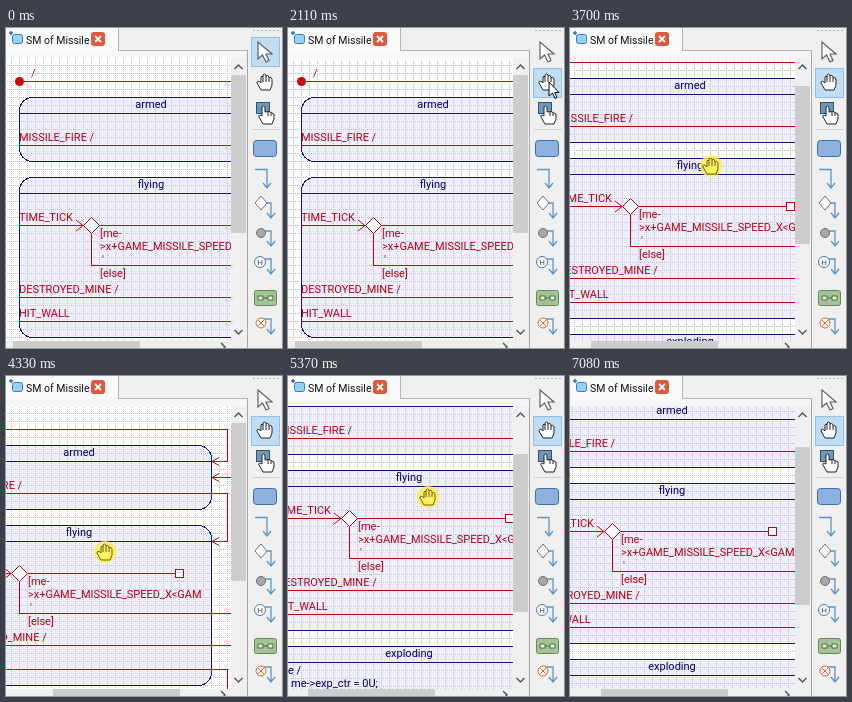
An HTML page that plays this animation: 276 by 320 pixels, repeating every 7.68 s.

```html
<!DOCTYPE html>
<html lang="en">
<head>
<meta charset="utf-8">
<title>State machine panning</title>
<style>
  html, body { margin: 0; width: 100%; height: 100%; overflow: hidden; background: #f0f0f0; }
  svg { display: block; width: 276px; height: 320px; }
  text { font: 11px Roboto, "Open Sans", sans-serif; }
  .crisp, .wire, .edge { shape-rendering: crispEdges; }
  .wire, .tip { fill: none; stroke: #c80000; }
  .red { fill: #b80010; }
  .navy { fill: #000060; }
  .edge { fill: none; stroke: #101080; }
  .state { fill: #eeeefc; }
  .blue { fill: none; stroke: #5b95c8; stroke-width: 1.3; }
  .bar { fill: #cdcdcd; }
  .arrow { fill: none; stroke: #505868; stroke-width: 1.5; }
  .hand { fill: var(--palm, #fff); stroke: var(--ink, #222); stroke-linejoin: round; }
  .halo { fill: #fff040; opacity: 0; }
  .drag { --palm: #fff060; --ink: #6c5c18; }
  .drag .halo { opacity: .8; }
</style>
</head>
<body>
<svg viewBox="0 0 276 320">
  <defs>
    <pattern id="grid" width="8" height="8" x="5" y="5" patternUnits="userSpaceOnUse">
      <path class="crisp" d="M0 .5H8M.5 0V8" stroke="#bcbccc" stroke-dasharray="1 1" fill="none"/>
    </pattern>
    <clipPath id="view"><rect y="30" width="225" height="283"/></clipPath>
    <path id="hand" class="hand" d="M-4 8L-8 1Q-8-2-5 0L-4 1V-5Q-3-7-2-5V-7Q-.5-9 1-7V-6Q3-8 4-5V-4Q6-6 7-3V3L5 8ZM-2-5V0M1-6V0M4-4V0"/>
    <path id="drop" class="blue" d="M-3-7H6V7M2 3L6 8L10 3"/>
  </defs>

  <g clip-path="url(#view)">
    <rect width="225" height="320" fill="#fff"/>
    <g id="world">
      <g id="fills"></g>
      <rect x="-16" y="-16" width="400" height="500" fill="url(#grid)"/>
      <g id="edges"></g>
      <path class="wire" d="M13 53.5H293.5V85.5H278M13 117.5H293.5V165.5H278M340 101.5H278
        M13 197.5H77M93 197.5H241M85.5 206V237.5H340M13 269.5H340M13 293.5H293.5V341.5H278"/>
      <path id="tips" class="tip"/>
      <path class="tip" d="M70 192L77 197.5L70 203"/>
      <path d="M85.5 189.5L93.5 197.5L85.5 205.5L77.5 197.5Z" fill="#fff" stroke="#b00010"/>
      <rect class="wire" x="241.5" y="193.5" width="8" height="8" style="fill:#fff"/>
      <circle cx="13.5" cy="53.5" r="4.5" fill="#d00010"/>
      <g id="labels"></g>
    </g>
  </g>

  <rect width="276" height="30" fill="#f0f0f0"/>
  <rect width="112" height="23" fill="#fafafa"/>
  <rect y="23" width="241" height="7" fill="#f6f7f9"/>
  <path class="crisp" d="M112.5 0V22.5H241" fill="none" stroke="#b4b4b4"/>
  <rect x="6.500" y="6.500" width="10" height="9" rx="2" fill="#9bd0f5" stroke="#2f7fc0"/>
  <path d="M3 5H7M5 3V7" stroke="#2f70b0" stroke-width="1.5"/>
  <text x="20" y="16" fill="#111" style="font-size:10.500px">SM of Missile</text>
  <rect x="85" y="4" width="14" height="14" rx="3" fill="#e0583c"/>
  <path d="M89 8L95 14M95 8L89 14" stroke="#fff" stroke-width="1.8"/>

  <rect x="225" y="30" width="16" height="290" fill="#f0f0f0"/>
  <rect y="313" width="241" height="7" fill="#f0f0f0"/>
  <rect id="thumbY" class="bar" x="225" y="47" width="15" height="158"/>
  <rect id="thumbX" class="bar" x="7" y="313" width="127" height="7"/>
  <path class="arrow" d="M228.500 41L232.500 37L236.500 41M228.500 302L232.500 306L236.500 302M215 315L219 319L215 323"/>

  <rect x="241" y="23" width="35" height="297" fill="#f0f0f0"/>
  <path class="crisp" d="M241.500 22V320" stroke="#a8a8a8"/>
  <path class="crisp" d="M247 2.500H275" stroke="#b0b0b0" stroke-dasharray="2 2"/>
  <path class="crisp" d="M246 101.500H274" stroke="#d0d0d0"/>
  <rect id="hover" class="crisp" x="245.500" width="28" height="29" fill="#e0eefa" stroke="#b8daf4"/>
  <rect id="chosen" class="crisp" x="245.500" width="28" height="29" fill="#c0ddf3" stroke="#8cc2ea"/>
  <path d="M252 14V31L256.500 27L260 34L263 32.500L260 26H266Z" fill="#fff" stroke="#606060" stroke-width="1.2"/>
  <use href="#hand" x="259" y="54"/>
  <rect x="250.500" y="74.500" width="13" height="11" fill="#6f98bc" stroke="#34506c"/>
  <path class="hand" d="M257 96L253 89Q252 86 256 88V79Q257.500 77 259 79V84L263 83.500L268 86V91L266 96ZM262 84V88M265 85V88"/>
  <rect x="247.500" y="112.500" width="23" height="16" rx="3" fill="#8db2e0" stroke="#3f6cac"/>
  <path class="blue" d="M249 141.500H261V159M257 155L261 160L265 155"/>
  <g id="drops"></g>
  <path d="M255 168L261 175L255 182L249 175Z" fill="#fff" stroke="#707070"/>
  <circle cx="255" cy="205" r="4.500" fill="#a8a8a8" stroke="#707070"/>
  <circle cx="254" cy="234" r="5.500" fill="#fff" stroke="#4a78b0"/>
  <text x="251.300" y="237" fill="#345" style="font-size:8px">H</text>
  <rect x="248.500" y="262.500" width="22" height="15" rx="2" fill="#a4c496" stroke="#64885a"/>
  <path d="M252 268H257V272H252ZM262 268H267V272H262ZM257 270H262" fill="#e8f4e0" stroke="#4c6c40"/>
  <circle cx="255" cy="295" r="5" fill="#fff" stroke="#e06430"/>
  <path d="M252 292L258 298M258 292L252 298" stroke="#e06430"/>

  <g id="cursor">
    <circle class="halo" r="11"/>
    <use id="palm" href="#hand"/>
    <path id="arrow" d="M0 0V14L3.500 11L6 16.500L8 15.500L5.700 10.500H10Z" fill="#fff" stroke="#000"/>
  </g>
</svg>

<script>
const $ = id => document.getElementById(id);
const LOOP = 7680;

const states = [['armed', 69, 64], ['flying', 149, 160], ['exploding', 325, 176]];
const notes = [
  ['/', 25, 49], ['MISSILE_FIRE /', 13, 113], ['TIME_TICK', 13, 193],
  ['[me-', 94, 209], ['>x+GAME_MISSILE_SPEED_X<GAM', 94, 222], ["'", 96, 235],
  ['[else]', 94, 249], ['DESTROYED_MINE /', 13, 265], ['HIT_WALL', 13, 289]
];
const actions = [['e /', 24, 353], ['me->exp_ctr = 0U;', 27, 366]];
const label = (s, x, y, cls, more = '') => {
  const safe = s.replace(/</g, '&lt;').replace(/>/g, '&gt;');
  return `<text class="${cls}" x="${x}" y="${y}" ${more}>${safe}</text>`;
};
const box = (cls, y, h) =>
  `<rect class="${cls}" x="13.5" y="${y + .5}" width="264" height="${h}" rx="13"/>`;

$('fills').innerHTML = states.map(([, y, h]) => box('state', y, h)).join('');
$('edges').innerHTML = states.map(([, y, h]) =>
  box('edge', y, h) + `<path class="edge" d="M13 ${y + 16.5}H278"/>`).join('');
$('labels').innerHTML =
  states.map(([s, y]) => label(s, 145, y + 11, 'navy', 'text-anchor="middle"')).join('') +
  notes.map(n => label(...n, 'red')).join('') +
  actions.map(n => label(...n, 'navy')).join('');
$('tips').setAttribute('d', [85.5, 101.5, 165.5, 341.5].map(y => `M285 ${y - 4}L278 ${y}L285 ${y + 4}`).join(''));
$('drops').innerHTML = [182, 210, 238, 298].map(y => `<use href="#drop" x="259" y="${y}"/>`).join('');

const tools = [24, 55, 86, 120, 149, 181, 210, 239, 269, 299];

// time, x, y
const pointer = [
  [70, 262, 318], [830, 262, 86], [1380, 261, 54], [2110, 261, 54], [2670, 105, 130],
  [3050, 60, 128], [3380, 92, 97], [3700, 141, 138], [4010, 128, 172], [4330, 99, 176],
  [4680, 68, 140], [5020, 98, 100], [5370, 140, 121], [5680, 128, 155], [5990, 87, 142],
  [6270, 95, 112], [6540, 126, 136], [6800, 126, 136], [7080, 290, 335]
];
const scroll = [
  [2680, 0, 0], [3050, -45, -6], [3380, -38, -42], [3700, -25, -19], [4010, -40, 0],
  [4330, -72, 0], [4680, -95, -36], [5020, -68, -76], [5370, -24, -55], [5680, -40, -24],
  [5990, -82, -39], [6270, -74, -68], [6540, -43, -42]
];

// Cubic through the keys, flat at turning points so it never overshoots
function slope(keys, i, k) {
  const a = keys[i - 1], b = keys[i], c = keys[i + 1];
  if (!a || !c || (b[k] - a[k]) * (c[k] - b[k]) <= 0) return 0;
  return (c[k] - a[k]) / (c[0] - a[0]);
}
function at(keys, t, k) {
  const last = keys.length - 1;
  if (t <= keys[0][0]) return keys[0][k];
  if (t >= keys[last][0]) return keys[last][k];
  const i = keys.findIndex(p => p[0] > t) - 1;
  const a = keys[i], b = keys[i + 1], d = b[0] - a[0], u = (t - a[0]) / d;
  const v = u * u * (3 - 2 * u);
  return a[k] + (b[k] - a[k]) * v
    + d * u * (1 - u) * ((1 - u) * slope(keys, i, k) - u * slope(keys, i + 1, k));
}
const point = (keys, t) => [1, 2].map(k => Math.round(at(keys, t, k)));
const move = (id, x, y) => $(id).setAttribute('transform', `translate(${x} ${y})`);
const show = (id, on) => $(id).style.display = on ? '' : 'none';

function draw(t) {
  const [ox, oy] = point(scroll, t);
  move('world', ox, oy);
  $('thumbX').setAttribute('x', 7 - Math.round(ox * .55));
  $('thumbY').setAttribute('y', 47 - Math.round(oy * .56));

  const [x, y] = point(pointer, t);
  const inPalette = x > 242;
  move('cursor', x, y);
  show('cursor', t >= 70 && t < 7080);
  show('arrow', inPalette);
  show('palm', !inPalette);
  $('cursor').classList.toggle('drag', t >= 2740 && t < 6600);

  const picked = t >= 1910 ? 1 : 0;
  $('chosen').setAttribute('y', tools[picked] - 14.5);
  const over = tools.find(c => Math.abs(c - y - 3) < 14);
  show('hover', t >= 70 && t < 1910 && over);
  if (over) $('hover').setAttribute('y', over - 14.5);
}

const start = performance.now();
function tick() {
  draw((performance.now() - start) % LOOP);
  requestAnimationFrame(tick);
}
tick();
</script>
</body>
</html>
```
